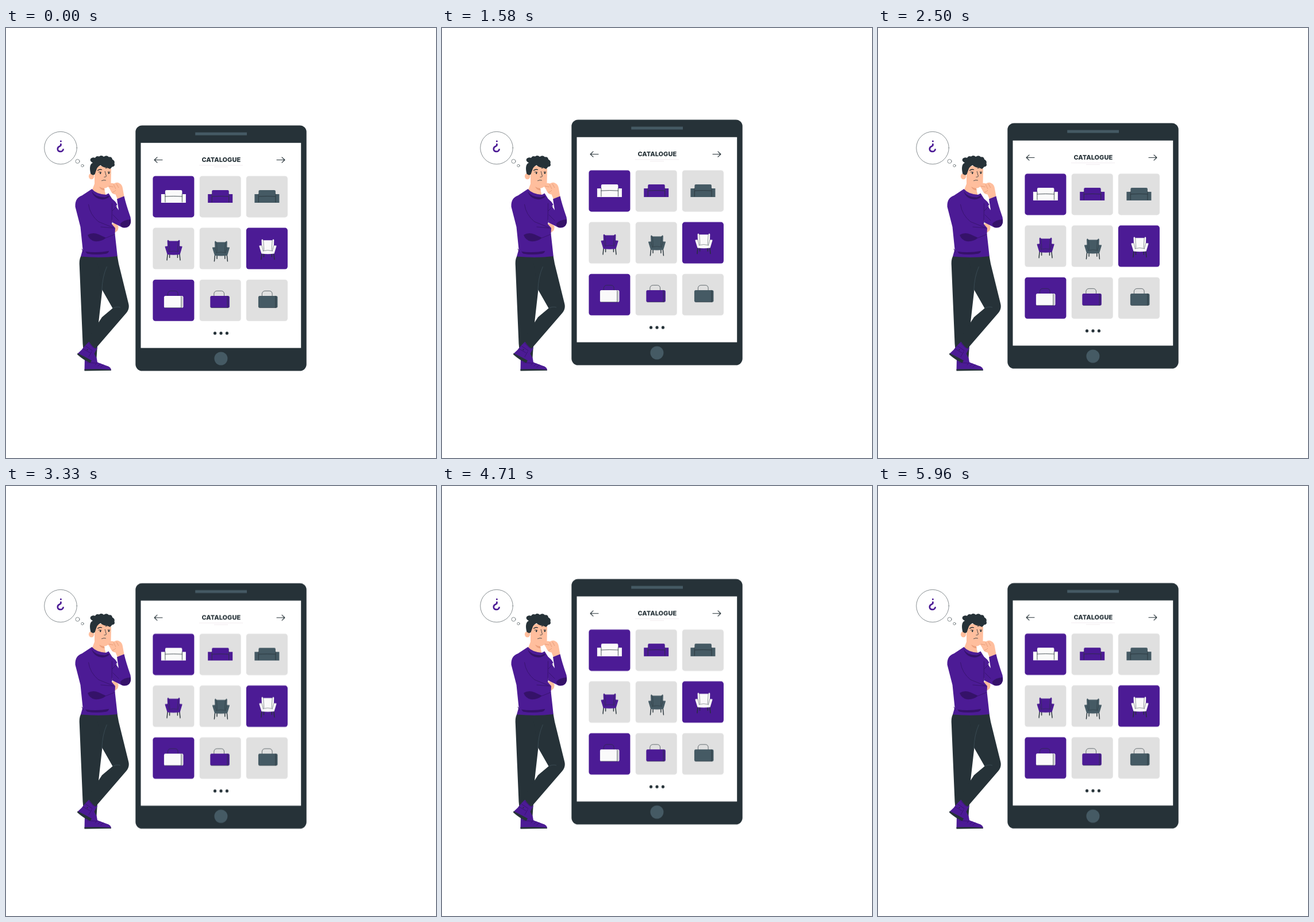
Recreate the animation shown at these times as an HTML page. Size 748x748 px, loop 6 s.

```html
<!DOCTYPE html>
<html lang="en">
<head>
<meta charset="utf-8">
<title>Catalogue</title>
<style>
  html, body { margin: 0; width: 100%; height: 100%; overflow: hidden; background: #fff; }
  svg { display: block; width: 100%; height: 100%; }
  .ink { fill: #263238; }
  .slate { fill: #455a64; }
  .purple { fill: #4c1b95; }
  .shade { fill: #351269; }
  .skin { fill: #ffbe9d; }
  .grey { fill: #e0e0e0; }
  .paper { fill: #fafafa; }
  .line { fill: none; stroke: #263238; stroke-width: .8; stroke-linecap: round; stroke-linejoin: round; }
  .fold { fill: none; stroke: #351269; stroke-width: .8; stroke-linecap: round; }
  .crease { fill: none; stroke: #455a64; stroke-width: .6; }
  .title { font: 800 11px Inter, "Open Sans", sans-serif; text-anchor: middle; }
  .tablet { animation: float 6s linear infinite; }
  @keyframes float {
    0% { transform: translateY(0); }
    10.67% { transform: translateY(-3.1px); }
    20.83% { transform: translateY(-7.2px); }
    26.33% { transform: translateY(-10px); }
    31.33% { transform: translateY(-7.6px); }
    41.67% { transform: translateY(-4.1px); }
    52.17% { transform: translateY(-.2px); }
    54% { transform: translateY(0); }
    55.5% { transform: translateY(-.45px); }
    69.5% { transform: translateY(-5.1px); }
    73.33% { transform: translateY(-6.3px); }
    83.67% { transform: translateY(-9.3px); }
    87.5% { transform: translateY(-7.7px); }
    94.17% { transform: translateY(-4.4px); }
    99.33% { transform: translateY(-.8px); }
    100% { transform: translateY(-.4px); }
  }
</style>
</head>
<body>
<svg viewBox="0 0 748 748" xmlns="http://www.w3.org/2000/svg">
  <defs>
    <rect id="card" width="72" height="72" rx="4.5"/>
    <g id="sofa">
      <rect x="21.5" y="24.5" width="29.5" height="13" rx="2.2"/>
      <path d="M14.5 31.5h7v4.5h29.5v-4.5h6.5v15h-43z"/>
      <g class="line" stroke-width=".6">
        <path d="M21.5 31.5v14M51 31.5v14M21.5 35.6q15-.9 29.5 0"/>
      </g>
    </g>
    <g id="chair">
      <path class="line" style="stroke-width:1.4" d="M4.2 25.5 3.2 35.5M25.2 25.5l1 10M7.8 25v6M21.6 25v6"/>
      <path d="M3.8 2Q4 .2 5.5.4L7 2.2h15.5L24 .4q1.6-.2 1.6 1.6l-.3 9.2 4.2.2q.6.5.1 1.5L25.800 25.600Q14.600 27 3.800 25.600L-.1 12.900q-.4-1 .3-1.500l4-.200z"/>
      <path class="line" style="stroke-width:.5" d="M4.200 11.200 6.800 21M25.300 11.200 22.500 21M7 2.200l1.100 17M22.500 2.200l-1.100 17M6.500 20.700q8-2.300 16.300 0"/>
    </g>
    <g id="bag">
      <path class="line" style="stroke-width:.65" d="M6.500 9.800V5Q7.200.5 12 .4h7.200q4.500.2 5 4.600v4.800"/>
      <rect y="9" width="33.500" height="20.800" rx="2.500"/>
      <path class="line" style="stroke-width:.55" d="M29.600 9.200v20.400M31.200 10.500v17.800M2 29.600h29"/>
    </g>
  </defs>

  <!-- Thought bubble -->
  <g class="line" style="stroke-width:.55">
    <circle cx="95" cy="208.600" r="28.300"/>
    <circle cx="124.500" cy="231.900" r="3.500"/>
    <circle cx="133" cy="239.500" r="2.200"/>
  </g>
  <path d="M95.400 201v3.200c0 1.600-5.600 1.400-5.600 6.200 0 6.200 9.600 6 9.900-.2" fill="none" stroke="#4c1b95" stroke-width="2.700"/>
  <circle class="purple" cx="95.400" cy="197" r="1.500"/>

  <!-- Legs and shoes -->
  <path class="purple" d="M137 573H157.500L159 581.500Q171 586 178 588.500Q183 591 183 595.500H136.500z"/>
  <path class="ink" d="M136.500 593.500 160 593.200 182.700 594.200V595.700L136.500 596.500z"/>
  <path class="fold" d="M141 582l16 1M159 582l-4 4M164 584l-4 4M169 586l-4 4"/>
  <path class="ink" d="M131 396Q127 401 127.800 413L133.500 549 136 575 157.500 573.500 159 552 160.500 517 167.500 455 183 397z"/>
  <path class="purple" d="M146.500 543.500 159 556.500 153.500 566.500 157.500 574.500Q151 578.500 144 578L124.500 566.500Q132 560 138 552z"/>
  <path class="ink" d="M124.500 565.500 140 573.500 149 578.500 146.500 582.500Q136 578.500 124 568z"/>
  <path class="fold" d="M138 553l12 8M134 558l12 7M144 548l9 9M149 563l-5 9"/>
  <circle class="ink" cx="141.500" cy="559.500" r="1.100"/>
  <path class="ink" d="M157 396H193.500L196 410 213 479Q215.500 488.500 209.500 495.500L155.500 558Q146.500 551 142 541.500L167 503 185.500 487.500 167 455z"/>
  <path class="crease" d="M175.500 415Q167.500 433 166.800 456M186 487q8-3 13-1"/>

  <!-- Head and supporting hand -->
  <path class="skin" d="M154 244Q166 235 183 245L182.500 270Q179 278 170.500 279L174 292 162 297 149 284 154 271z"/>
  <ellipse class="skin" cx="148.600" cy="258" rx="4.700" ry="5.300"/>
  <path d="M162 276q5 3 9 3l.8 3.500q-7-.5-9.800-6.500z" fill="#eb9f7c"/>
  <path class="ink" d="M147.500 254C145 245 145.500 236 151 234.500Q144.500 231 147.500 227Q151 224 155 226Q157 221.500 162 223.500Q166.500 220.500 170 224Q175 220.500 179 224.500Q184 223.500 185 228.500Q190 231 188.500 235.500Q190.500 241 184.500 241.500Q181 247.500 176.500 242.500Q169 243.500 164.500 238.500Q159 241 157.500 246L154.500 254.500 151.500 256z"/>
  <g class="line">
    <path d="M159.500 247.800q3.500-2.700 7-1.300M173.500 243.800q4-2 7.500.7" style="stroke-width:1.300"/>
    <path d="M161 250.500q2.500-1 5 .4M177 250.300q2-1 4 .2M172.200 249.500l2.300 8.500q-1 1.600-3.600 1.300M166.500 265.600q3.500-1.800 7-.7"/>
  </g>
  <ellipse class="ink" cx="164.200" cy="252.500" rx="1.200" ry="1.700"/>
  <ellipse class="ink" cx="178.900" cy="252.300" rx="1.200" ry="1.700"/>
  <path class="skin" d="M178.500 272Q181 268.500 188 270.500Q193 267.500 197 270Q202 272 203 279L205.500 293 194 298 190.500 289.500Q184.500 289 182.500 284Q180.500 279 177 275z"/>
  <path d="M178.800 275l8 1.500M187 272l4 8M192 271l4 7M185 286q4-1 6-4" fill="none" stroke="#d98b68" stroke-width=".65"/>

  <!-- Sweater -->
  <path class="skin" d="M183 341Q190 337 195.500 345Q196 352 191.500 354.500L186 358z"/>
  <path class="purple" d="M193 297.500 205.500 292.500Q208.500 306 216.500 329Q218.500 338 214.500 344Q210 349 202.500 347L184.500 338 181 299 186.500 303 196 317z"/>
  <path class="shade" d="M198.500 341Q204 333.500 216.800 333Q218.500 339 214 344.500Q208 348.500 201 346z"/>
  <path class="purple" d="M149.500 280Q157 289 174 290L178.500 287.500 184.500 297Q190 301 193.500 307L185 319 184 341 190 348 189.500 358 193.800 397Q164 400.500 130 397.500L133.500 385 129.500 346 120.500 311Q119.500 296 132 291.500z"/>
  <path class="shade" d="M149 284Q156 295 172 294.500L179 291.500 179.500 294Q168 302 157 295Q151 291 149 284z"/>
  <path class="shade" d="M142 360Q151 354.500 161 359L174 365Q166 372 154.500 371Q145 369 142 360z"/>
  <path class="shade" d="M138 388.800Q158 391.800 179 387.800Q179 391.500 174 392.800Q156 395.500 141 392.500z"/>
  <path class="fold" d="M143.500 307Q146 325 161 337L187 347.500M165 346l22 2M174 365l15-6M184.500 305l-.5 34M132 384.500l3 6M185 318l8-8M186 325l10 10"/>

  <!-- Tablet -->
  <g class="tablet">
    <rect class="ink" x="225.300" y="169.400" width="297.400" height="427.200" rx="11.500"/>
    <rect x="234.500" y="199.800" width="278.700" height="356.800" fill="#fff"/>
    <rect class="slate" x="329.200" y="181.600" width="89.800" height="5"/>
    <circle class="slate" cx="373.900" cy="575" r="11.500"/>
    <text class="title ink" x="374.300" y="233">CATALOGUE</text>
    <path d="M336 238.700h76M362 241.600h24" fill="none" stroke="#ece4ea" stroke-width=".7"/>
    <path class="line" style="stroke-width:1.150" d="M272 229.500h-13.800M263 224.800l-4.900 4.700 4.900 4.700M471 229.500h13.800M480 224.800l4.900 4.700-4.900 4.700"/>

    <g class="purple">
      <use href="#card" x="255.400" y="257.400"/>
      <use href="#card" x="417.900" y="347.600"/>
      <use href="#card" x="255.400" y="437.800"/>
    </g>
    <g class="grey">
      <use href="#card" x="336.700" y="257.400"/>
      <use href="#card" x="417.900" y="257.400"/>
      <use href="#card" x="255.400" y="347.600"/>
      <use href="#card" x="336.700" y="347.600"/>
      <use href="#card" x="336.700" y="437.800"/>
      <use href="#card" x="417.900" y="437.800"/>
    </g>

    <use class="paper" href="#sofa" x="255.400" y="257.400"/>
    <use class="purple" href="#sofa" x="336.700" y="257.400"/>
    <use class="slate" href="#sofa" x="417.900" y="257.400"/>

    <use class="purple" href="#chair" x="276.800" y="368.400"/>
    <use class="slate" href="#chair" x="359.200" y="370.200"/>
    <use class="paper" href="#chair" x="440.700" y="367"/>

    <use class="paper" href="#bag" x="274.900" y="457"/>
    <use class="purple" href="#bag" x="355.300" y="457"/>
    <use class="slate" href="#bag" x="438.900" y="457"/>

    <g class="ink">
      <circle cx="363.500" cy="530.900" r="2.600"/>
      <circle cx="374" cy="530.900" r="2.600"/>
      <circle cx="384.400" cy="530.900" r="2.600"/>
    </g>
  </g>
</svg>
</body>
</html>
```
